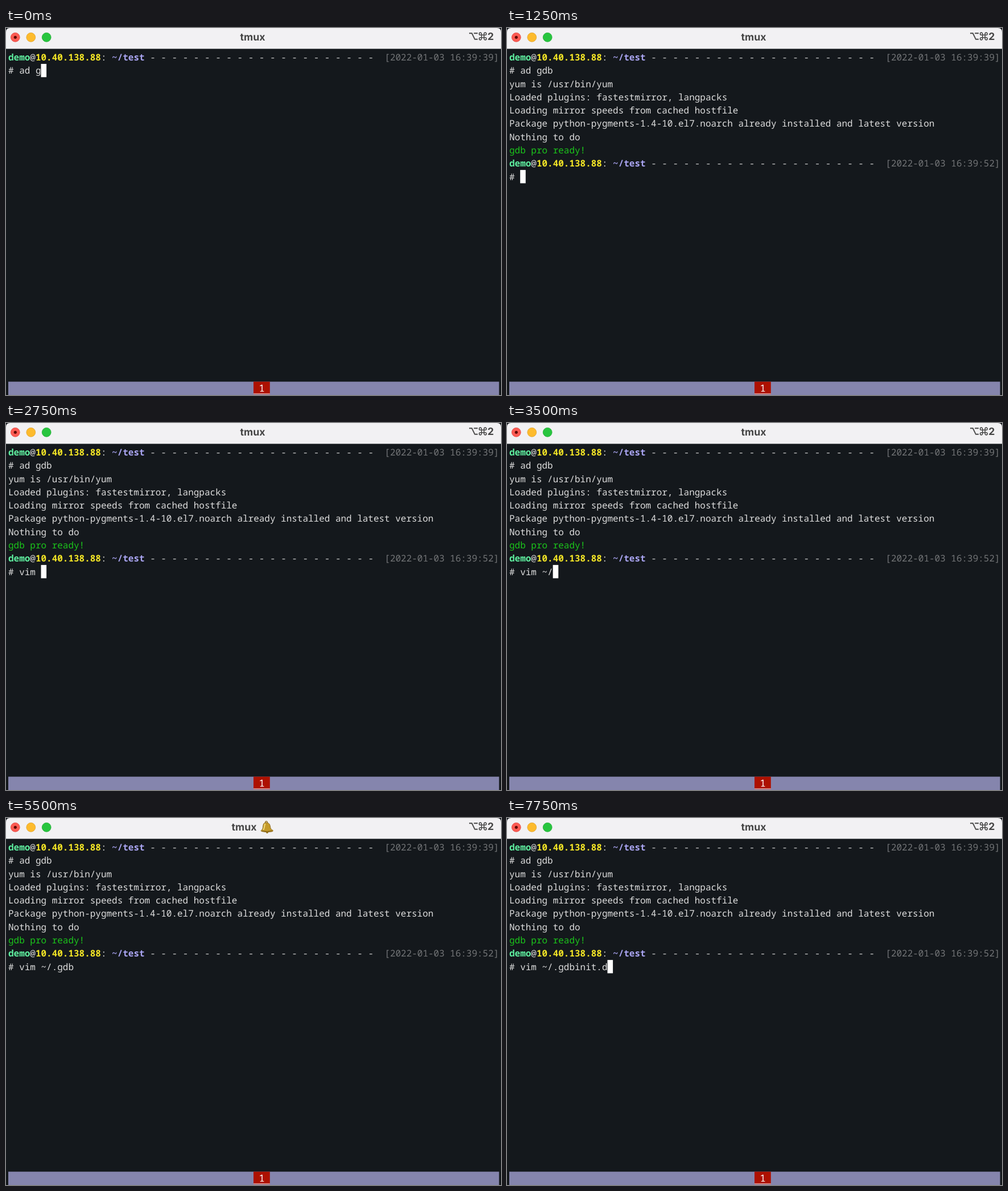
Write an HTML page that moves like this. It is 870 by 644 pixels and loops after 8000 ms.

```html
<!DOCTYPE html>
<html lang="en">
<head>
<meta charset="utf-8">
<title>Terminal</title>
<style>
  html, body { margin: 0; width: 100%; height: 100%; overflow: hidden; background: #14181c; }
  svg { display: block; width: 870px; height: 644px; }
  text { white-space: pre; text-rendering: geometricPrecision; }
  .mono { font: 15.975px "Noto Sans Mono", monospace; }
  .bold { font-weight: 700; }
  .ui { font: 700 17.7px Inter, sans-serif; fill: #454545; }
</style>
</head>
<body>
<svg viewBox="0 0 870 644" xmlns="http://www.w3.org/2000/svg">
  <rect width="870" height="644" fill="#14181c"/>
  <path d="M0 36V7Q0 0 7 0H863Q870 0 870 7V36Z" fill="#f2f1f3"/>
  <rect y="36" width="870" height="1" fill="#85878a"/>

  <g stroke-width=".8">
    <circle cx="16.3" cy="16.3" r="7.9" fill="#fc5b53" stroke="#e0453e"/>
    <circle cx="16.3" cy="16.3" r="2.6" fill="#5e0904"/>
    <circle cx="43.8" cy="16.3" r="7.9" fill="#fdbb2d" stroke="#e0a028"/>
    <circle cx="71.2" cy="16.3" r="7.9" fill="#28c53f" stroke="#20ab32"/>
  </g>

  <text id="title" class="ui" y="22">tmux</text>
  <g id="bell">
    <circle cx="457.5" cy="7.4" r="1.8" fill="none" stroke="#94701a" stroke-width="1.4"/>
    <path d="M457 8C462 8 464 11 464.5 15C465 19 466 20 469 21.5Q470 23 468 23.8Q458 26 449 23.5Q447.2 22.6 449 21.3C451 20 451.3 18 451.6 15C452 11 453 8 457 8Z" fill="#c49a2a" stroke="#7d5c16" stroke-width=".8"/>
    <path d="M455.5 10C453.8 13 454.5 18 452.2 21" fill="none" stroke="#f0d978" stroke-width="2"/>
    <path d="M450 22.5Q458 24.8 467.5 22.5" fill="none" stroke="#7d5c16" stroke-width="1"/>
    <circle cx="459" cy="25" r="2" fill="#94701a"/>
  </g>

  <g fill="none" stroke="#4a4a4a" stroke-width="1.9">
    <path d="M814 9.3H818.8L824 19.8H829M822.3 9.3H829"/>
    <path d="M835.8 12.3H840.2V16.7H835.8ZM835.8 12.3H833.7A2.1 2.1 0 1 1 835.8 10.2ZM840.2 12.3V10.2A2.1 2.1 0 1 1 842.3 12.3ZM840.2 16.7H842.3A2.1 2.1 0 1 1 840.2 18.8ZM835.8 16.7V18.8A2.1 2.1 0 1 1 833.7 16.7Z" stroke-width="1.6"/>
  </g>
  <text class="ui" x="857.5" y="20.8" text-anchor="end">2</text>

  <g id="screen"></g>
  <text id="input" class="mono" x="4" fill="#dedede"></text>
  <rect id="cursor" width="9.6" height="23.3" fill="#fff"/>

  <rect x="4" y="620.6" width="862.6" height="23.4" fill="#8585ad"/>
  <rect x="435" y="620.6" width="28.8" height="22.4" fill="#ad1100"/>
  <rect x="435" y="641.3" width="28.8" height="1.2" fill="#e8d5d8"/>
  <text class="mono" x="449.5" y="638.3" text-anchor="middle" fill="#fff" style="font-size:17px">1</text>
</svg>
<script>
const LOOP = 8000, LEFT = 4, CELL = 9.585, TOP = 39.7, ROW = 23.27, BASE = 17.4;
const PLAIN = '#dedede';
const $ = id => document.getElementById(id);
const rowY = row => TOP + row * ROW;

function put(row, col, str, fill = PLAIN, bold = false) {
  const el = document.createElementNS('http://www.w3.org/2000/svg', 'text');
  el.setAttribute('class', bold ? 'mono bold' : 'mono');
  el.setAttribute('x', LEFT + col * CELL);
  el.setAttribute('y', rowY(row) + BASE);
  el.setAttribute('fill', fill);
  el.textContent = str;
  $('screen').append(el);
  return el;
}

function prompt(row, clock) {
  return [
    put(row, 0, 'demo', '#5ff0a0', true),
    put(row, 4, '@'),
    put(row, 5, '10.40.138.88', '#f3e526', true),
    put(row, 17, ':'),
    put(row, 19, '~/test', '#aaa5f2', true),
    put(row, 26, '- '.repeat(21), '#c8c8c8'),
    put(row, 69, `[2022-01-03 ${clock}]`, '#737577')
  ];
}

prompt(0, '16:39:39');

// Output lines with the time each one appears
const output = [
  [500, [put(1, 0, '# ad gdb')]],
  [500, [put(2, 0, 'yum is /usr/bin/yum')]],
  [750, [put(3, 0, 'Loaded plugins: fastestmirror, langpacks')]],
  [1000, [put(4, 0, 'Loading mirror speeds from cached hostfile')]],
  [1000, [put(5, 0, 'Package python-pygments-1.4-10.el7.noarch already installed and latest version')]],
  [1000, [put(6, 0, 'Nothing to do')]],
  [1250, [put(7, 0, 'gdb pro ready!', '#1bc51b')]],
  [1250, prompt(8, '16:39:52')]
];

// Cursor line: [time, row, text]
const typing = [
  [0, 1, '# ad g'], [250, 1, '# ad gdb'],
  [500, 3, ''], [750, 4, ''], [1000, 7, ''], [1250, 9, '# ']
];
const command = 'vim ~/.gdbinit.d';
const keys = [2000, 2250, 2500, 2750, 3250, 3500, 3750, 4000, 4250, 4500,
  5750, 6000, 6250, 6500, 7500, 7750];
keys.forEach((at, i) => typing.push([at, 9, '# ' + command.slice(0, i + 1)]));

const within = (t, a, b) => t >= a && t < b;
const blinks = [[1750, 2000], [5250, 5750], [7000, 7250]];

function draw(t) {
  for (const [at, parts] of output)
    for (const el of parts) el.style.display = t >= at ? '' : 'none';

  const [, row, str] = typing.filter(step => step[0] <= t).pop();
  $('input').textContent = str;
  $('input').setAttribute('y', rowY(row) + BASE);
  $('cursor').setAttribute('x', LEFT + str.length * CELL);
  $('cursor').setAttribute('y', rowY(row));
  $('cursor').style.display = blinks.some(([a, b]) => within(t, a, b)) ? 'none' : '';

  const ringing = within(t, 4750, 7750);
  $('bell').style.display = ringing ? '' : 'none';
  $('title').setAttribute('x', ringing ? 396.6 : 411.6);
}

const start = performance.now();
function tick() {
  draw((performance.now() - start) % LOOP);
  requestAnimationFrame(tick);
}
tick();
</script>
</body>
</html>
```
